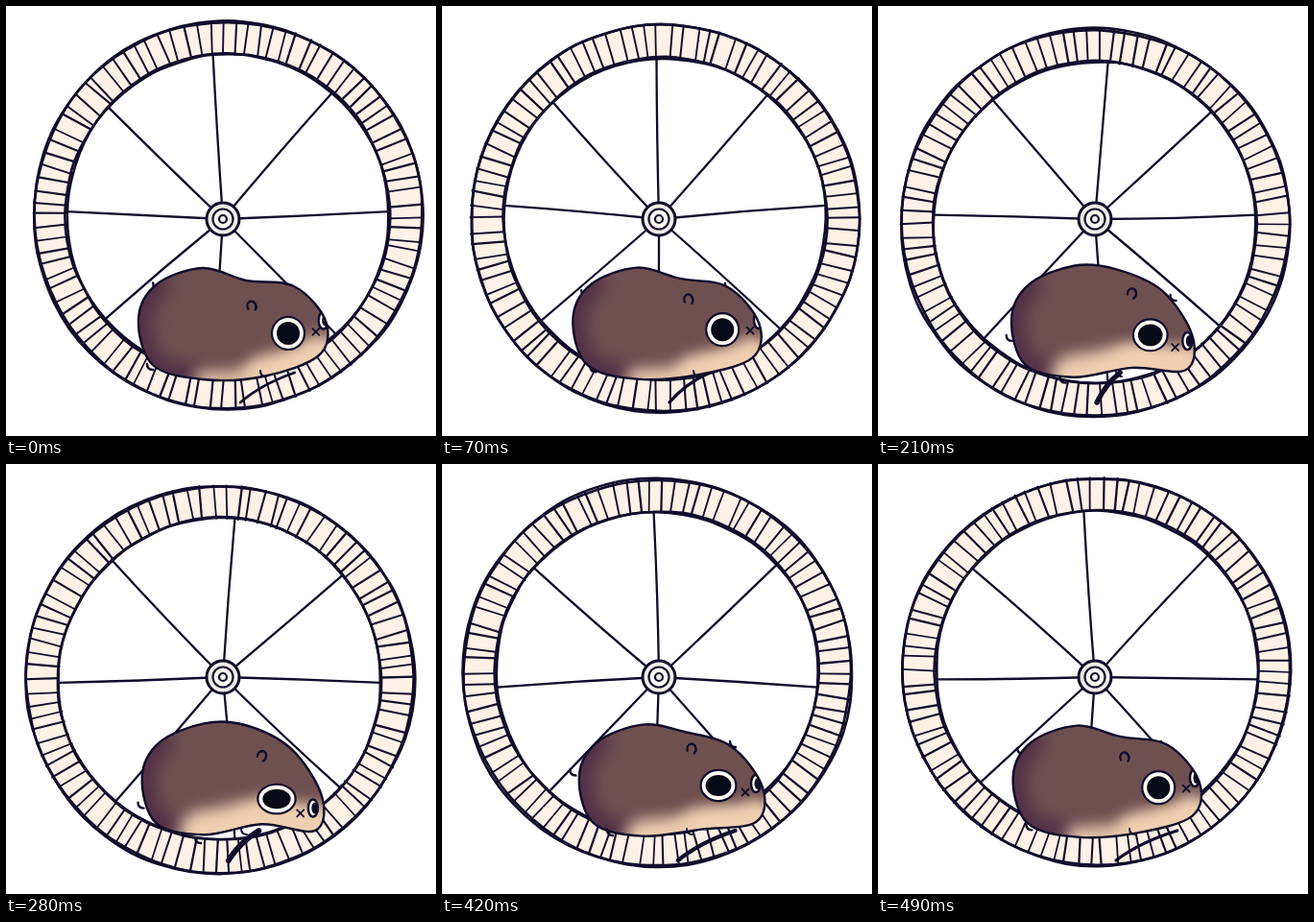
An HTML page with a canvas that plays this animation: 448 by 448 pixels, repeating every 0.56 s.

```html
<!DOCTYPE html>
<html lang="en">
<head>
<meta charset="utf-8">
<title>Hamster wheel</title>
<style>
html, body { margin: 0; width: 100%; height: 100%; overflow: hidden; background: #fff; }
canvas { display: block; width: 448px; height: 448px; }
</style>
</head>
<body>
<canvas id="stage" width="448" height="448"></canvas>
<script>
const ctx = document.getElementById('stage').getContext('2d');
const { sin, cos, exp, max, min, floor, PI } = Math;
const INK = '#100d2b', CREAM = '#fff1e6', WHITE = '#fffaf2';
const BROWN = '#6f5051', BELLY = '#efcfb1', SHADE = '#502d45';
const STEP_MS = 70, STEPS = 8, SLATS = 94, RIM = 34.5;
const HUB = [226, 222];

// Outstretched body, clockwise from the rump.
const BODY = [[138, 326], [157, 290], [205, 273], [250, 286], [300, 292],
  [333, 328], [326, 364], [268, 386], [205, 389], [153, 374]];

function random(seed) {
  return () => {
    const x = sin(seed++ * 12.9898) * 43758.5453;
    return x - floor(x) - 0.5;
  };
}

function stroke(width) {
  ctx.lineWidth = width;
  ctx.strokeStyle = INK;
  ctx.stroke();
}

function oval(x, y, rx, ry, color, width) {
  ctx.beginPath();
  ctx.ellipse(x, y, rx, ry, 0, 0, PI * 2);
  ctx.fillStyle = color;
  ctx.fill();
  if (width) stroke(width);
}

function curve([x0, y0], [x1, y1], [x2, y2], width) {
  ctx.beginPath();
  ctx.moveTo(x0, y0);
  ctx.quadraticCurveTo(x1, y1, x2, y2);
  stroke(width);
}

// Small hooked mark for toes, tail and the far ear.
function hook(x, y, size, width = 2.4) {
  curve([x - size, y - size], [x - size, y + size], [x + size, y + size], width);
}

// Smooth curve around a ring of points, or the part from `first` over `count` segments.
function smooth(points, first = 0, count = points.length) {
  const at = i => points[(i + points.length) % points.length];
  const path = new Path2D();
  path.moveTo(...at(first));
  for (let i = first; i < first + count; i++) {
    const [p, a, b, q] = [at(i - 1), at(i), at(i + 1), at(i + 2)];
    path.bezierCurveTo(a[0] + (b[0] - p[0]) / 6, a[1] + (b[1] - p[1]) / 6,
      b[0] - (q[0] - a[0]) / 6, b[1] - (q[1] - a[1]) / 6, ...b);
  }
  return path;
}

function softStroke(path, width, color, blur) {
  ctx.filter = `blur(${blur}px)`;
  ctx.lineWidth = width;
  ctx.strokeStyle = color;
  ctx.stroke(path);
  ctx.filter = 'none';
}

function drawWheel(phase, jitter) {
  const cx = 227 + 5 * cos(phase - 0.6), cy = 221 + 5 * sin(phase - 0.7);
  const onRim = (angle, inset) =>
    [cx + (202.5 - inset) * cos(angle), cy + (202 - inset) * sin(angle)];

  const handDrawnRing = inset => {
    const tilt = jitter() * 6;
    return smooth(Array.from({ length: 40 }, (_, i) => {
      const angle = i / 40 * PI * 2;
      return onRim(angle, inset + sin(angle * 3 + tilt) + jitter());
    }));
  };
  const outer = handDrawnRing(0), inner = handDrawnRing(RIM);
  ctx.fillStyle = CREAM;
  ctx.fill(outer);
  ctx.fillStyle = '#fff';
  ctx.fill(inner);

  for (let i = 0; i < SLATS; i++) {
    const angle = (i + jitter() * 0.45) / SLATS * PI * 2;
    const start = onRim(angle, 0), end = onRim(angle + jitter() * 0.025, RIM);
    curve(start, start, end, 2 + jitter() * 0.7);
  }
  ctx.lineWidth = 2.6;
  for (const ring of [outer, inner, handDrawnRing(0.5), handDrawnRing(RIM - 0.5)]) ctx.stroke(ring);

  // The spoke ends sway in a wave that travels around the rim.
  for (let i = 0; i < 8; i++) {
    const angle = i * PI / 4;
    const end = onRim(angle + 0.095 * cos(phase - angle + 1.8), RIM);
    const bend = HUB.map((v, k) => (v + end[k]) / 2 + jitter() * 4);
    curve(HUB, bend, end, 2.3);
  }
  oval(...HUB, 17, 17, '#f3eee8', 3);
  oval(...HUB, 10.5, 10.5, WHITE, 2.2);
  oval(...HUB, 4, 4, '#f3eee8', 2.2);
}

// Tucking in shortens the body, arches the back and lowers the nose.
function bodyPoints(phase, tuck) {
  return BODY.map(([x, y]) => [
    x + (232 - x) * 0.04 * tuck - 3 * sin(phase),
    y - 14 * tuck * exp(-(((x - 250) / 35) ** 2))
      + 18 * tuck * max(0, min(1, (x - 285) / 40))
  ]);
}

function drawHamster(phase) {
  const reach = cos(phase), tuck = (1 - reach) / 2;
  const tilt = -0.3 * reach, squint = max(0, -cos(phase - 0.5));
  const eyeX = 288 + 6 * reach, eyeY = 340 + 5 * cos(phase * 2) - 4 * reach;
  const onHead = (x, y) =>
    [eyeX + x * cos(tilt) - y * sin(tilt), eyeY + x * sin(tilt) + y * cos(tilt)];

  const swing = cos(phase + 0.9);
  curve([282 + 30 * swing, 382], [255 + 18 * swing, 394], [238 + 10 * swing, 413], 4.3 - 1.5 * reach);
  const tailAngle = PI + 0.2 + 0.6 * reach;
  hook(205 + 70 * cos(tailAngle), 333 + 58 * sin(tailAngle), 3);
  hook(...onHead(15, -43), 3);

  const points = bodyPoints(phase, tuck), shape = smooth(points);
  ctx.save();
  ctx.clip(shape);
  ctx.fillStyle = BROWN;
  ctx.fill(shape);
  softStroke(smooth(points, 8, 3), 26, SHADE, 9);
  softStroke(smooth(points, 6, 2), 18 + 34 * tuck, BELLY, 8);
  softStroke(smooth(points, 6, 1), 42, BELLY, 8);
  const [farX, farY] = onHead(39, -2);
  oval(farX, farY, 5, 9, WHITE, 2.5);
  oval(farX + 2, farY, 3.5, 6, INK);
  ctx.restore();
  ctx.lineWidth = 2.4;
  ctx.strokeStyle = INK;
  ctx.stroke(shape);

  const rx = 17 + 3 * squint, ry = 17 - 2 * squint;
  oval(eyeX, eyeY, rx, ry, WHITE, 2.2);
  oval(eyeX, eyeY, rx - 5, ry - 5, '#090a18');

  const [mouthX, mouthY] = onHead(28, 7);
  for (const side of [-3.5, 3.5]) {
    curve([mouthX - side, mouthY - 3.5], [mouthX, mouthY], [mouthX + side, mouthY + 3.5], 1.8);
  }

  ctx.beginPath();
  ctx.ellipse(...onHead(-28, -38), 4.5, 5.5, tilt, PI * 0.9, PI * 2.3);
  stroke(2.3);

  hook(175 - 25 * reach, 384 - 8 * reach, 3);
  hook(258 + 10 * reach, 383, 3, 2);
}

let shown = -1;
function render(now) {
  const step = floor(now / STEP_MS) % STEPS;
  if (step === shown) return;
  shown = step;
  const phase = step / STEPS * PI * 2;
  ctx.fillStyle = '#fff';
  ctx.fillRect(0, 0, 448, 448);
  ctx.lineCap = ctx.lineJoin = 'round';
  drawWheel(phase, random(step * 600 + 7));
  drawHamster(phase);
}

const start = performance.now();
function tick() {
  render(performance.now() - start);
  requestAnimationFrame(tick);
}
tick();
</script>
</body>
</html>
```
